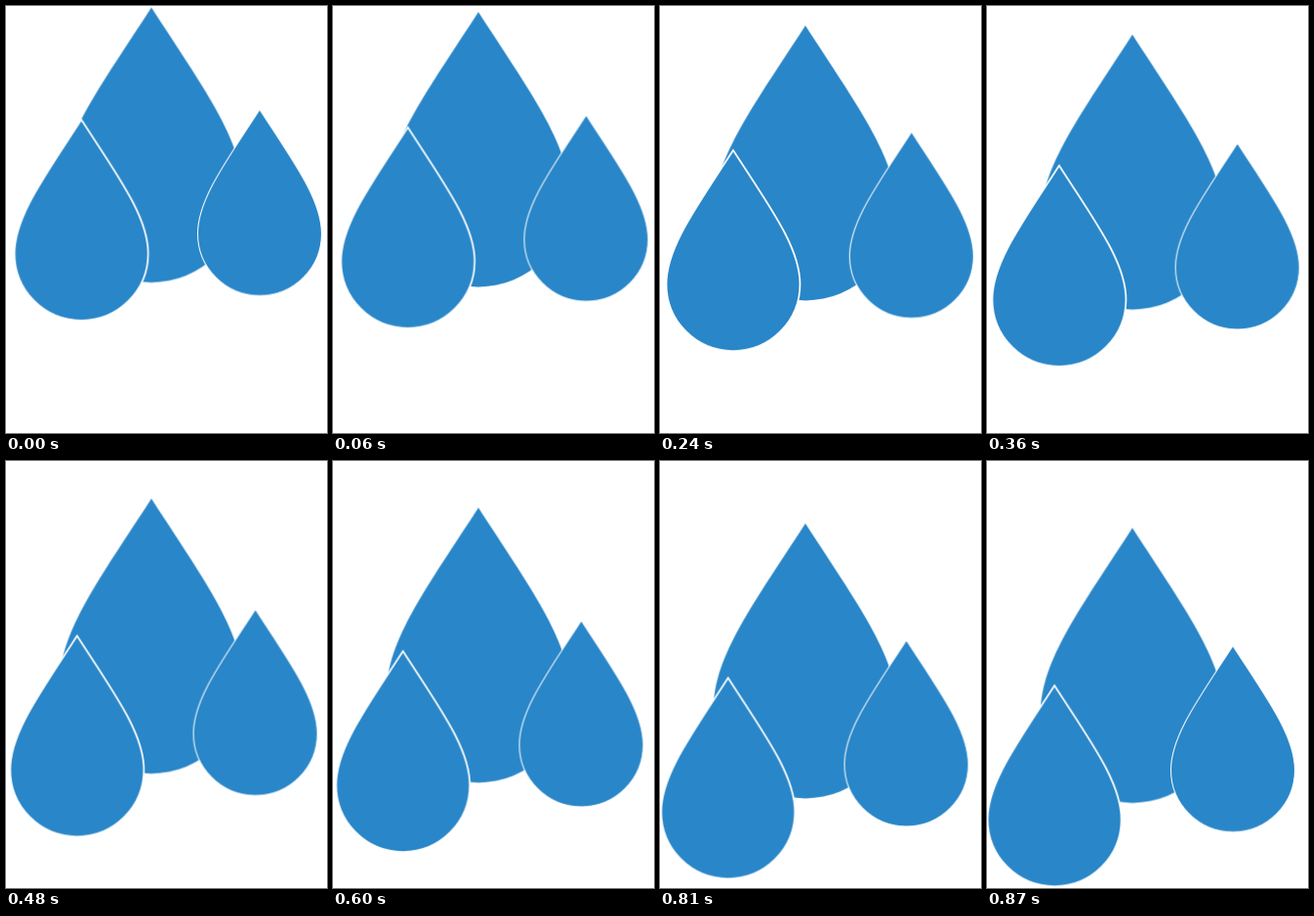
These frames come from a looping animation (329x437 px, 900 ms). An HTML page:

```html
<!DOCTYPE html>
<html lang="en">
<head>
<meta charset="utf-8">
<title>Falling drops</title>
<style>
  html, body { margin: 0; width: 100%; height: 100%; overflow: hidden; background: #fff; }
  svg { display: block; width: 329px; height: 437px; }
  .drop {
    fill: #2986c8;
    stroke: #fff;
    /* The 1 ms lead keeps each step clear of its boundary. */
    animation: fall 900ms steps(30, end) -1ms infinite;
  }
  .back  { --dx: 0px; --dy: 69.3px; stroke: none; }
  .left  { --dx: -8.3px; --dy: 117.4px; stroke-width: .025; }
  .right { --dx: -8.3px; --dy: 86px; stroke-width: .016; }
  @keyframes fall {
    from { transform: translate(0, 0); }
    to { transform: translate(var(--dx), var(--dy)); }
  }
</style>
</head>
<body>
<svg viewBox="0 0 329 437">
  <defs>
    <!-- Unit drop: tip at the origin, radius 1, height 3 -->
    <path id="drop" d="M0 0C.55 .85 1 1.45 1 2A1 1 0 0 1 -1 2C-1 1.45 -.55 .85 0 0Z"/>
  </defs>
  <g class="drop back"><use href="#drop" transform="translate(149 1.5) scale(93.8)"/></g>
  <g class="drop left"><use href="#drop" transform="translate(77.2 116.3) scale(68.5)"/></g>
  <g class="drop right"><use href="#drop" transform="translate(260 106) scale(63.5)"/></g>
</svg>
</body>
</html>
```
